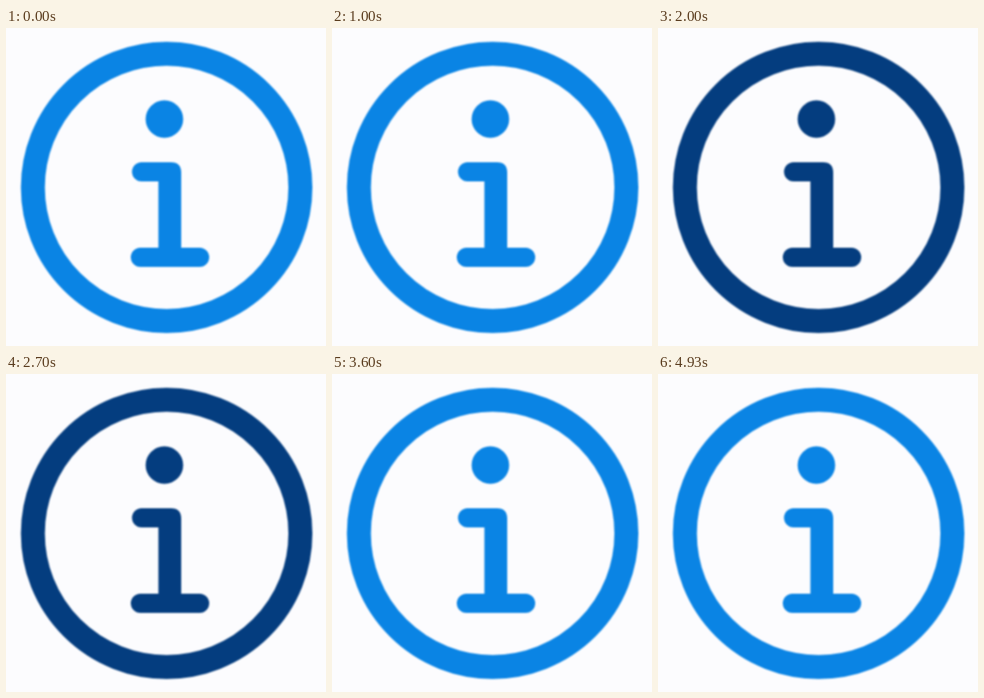
An HTML page for the animation above (4960 ms loop, 400 by 398 pixels).

```html
<!DOCTYPE html>
<html lang="en">
<head>
<meta charset="utf-8">
<title>Info icon</title>
<style>
  html, body {
    margin: 0;
    width: 100%;
    height: 100%;
    overflow: hidden;
    background: #fcfcfe;
  }
  svg {
    display: block;
    width: 400px;
    height: 398px;
  }
  .icon {
    color: #0a84e4;
    filter: blur(1px);
    animation: tone 4960ms step-end infinite;
  }
  /* bright, dark, bright again with hard switches */
  @keyframes tone {
    0% { color: #0a84e4; }
    25.2% { color: #043d7f; }
    70.56% { color: #0a84e4; }
  }
</style>
</head>
<body>
<svg viewBox="0 0 400 398" role="img" aria-label="Information">
  <g class="icon" fill="currentColor">
    <circle cx="200.8" cy="199.5" r="167.2" fill="none" stroke="currentColor" stroke-width="30"/>
    <circle cx="198" cy="114" r="23.5"/>
    <path d="M169.5 168H206Q219 168 219 181V275H242A12 12 0 0 1 242 299H168A12 12 0 0 1 168 275H190.5V192H169.5A12 12 0 0 1 169.5 168Z"/>
  </g>
</svg>
</body>
</html>
```
